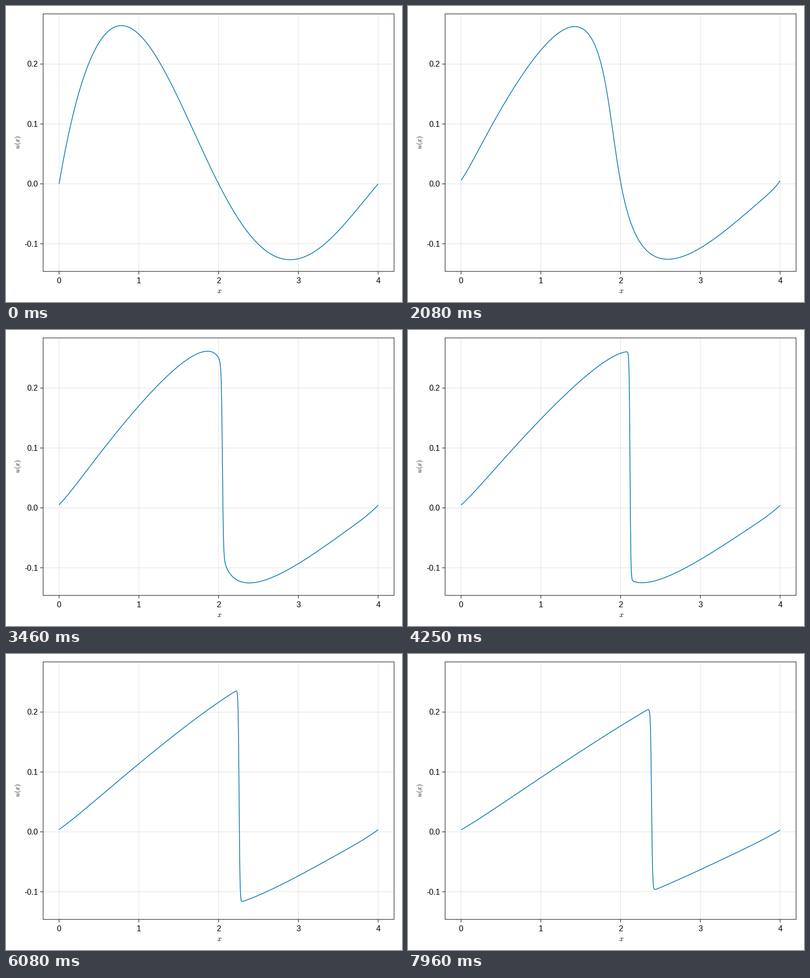
These frames come from a looping animation (800x600 px, 8000 ms). A matplotlib script:

```python
import numpy as np
import matplotlib.pyplot as plt
from matplotlib.animation import FuncAnimation

plt.rcParams["mathtext.fontset"] = "cm"
plt.rcParams["font.family"] = "Liberation Sans"

W, H, DPI = 800, 600, 72          # at 72 dpi one point is one pixel
FRAMES, DT, SUBSTEPS = 192, 0.05, 5
N, NU = 1024, 0.001
LEFT, RIGHT, TOP, BOTTOM = 75, 784, 16, 538
TICK, SMALL_MATH = 6, 14

x = np.linspace(0, 4, N)
u0 = np.sin(np.pi * x / 2) / (2 * (1 + x))


def solve():
    """Viscous Burgers equation, periodic, integrating-factor RK4."""
    k = 2 * np.pi * np.fft.rfftfreq(N, x[1] - x[0])
    h = DT / SUBSTEPS
    half = np.exp(-NU * k**2 * h / 2)
    full = half**2

    def flux(v):
        return -0.5j * k * np.fft.rfft(np.fft.irfft(v, N) ** 2)

    v = np.fft.rfft(u0)
    states = [u0]
    for _ in range(FRAMES - 1):
        for _ in range(SUBSTEPS):
            a = flux(v)
            b = flux(half * (v + h / 2 * a))
            c = flux(half * v + h / 2 * b)
            d = flux(full * v + h * half * c)
            v = full * v + h / 6 * (full * a + 2 * half * (b + c) + d)
        states.append(np.fft.irfft(v, N))
    return states


margin = 0.05 * (u0.max() - u0.min())
U_LOW, U_HIGH = u0.min() - margin, u0.max() + margin


def to_px(v):
    return LEFT + (v + 0.2) / 4.4 * (RIGHT - LEFT)


def to_py(u):
    return BOTTOM - (u - U_LOW) / (U_HIGH - U_LOW) * (BOTTOM - TOP)


fig = plt.figure(figsize=(W / DPI, H / DPI), dpi=DPI, facecolor="white")
ax = fig.add_axes([0, 0, 1, 1])
ax.set(xlim=(0, W), ylim=(H, 0))
ax.axis("off")


def stroke(xs, ys, color="black", z=3, **kw):
    return ax.plot(xs, ys, color=color, lw=kw.pop("lw", 1), zorder=z,
                   snap=False, solid_capstyle="butt", **kw)[0]


GRID = (0, 0, 0, 0.12)
for v in range(5):
    p = to_px(v)
    stroke([p, p], [TOP, BOTTOM], GRID, 1)
    stroke([p, p], [BOTTOM, BOTTOM + TICK], z=4)
    ax.text(p, 562.3, str(v), size=16, ha="center", va="baseline")

for v in (-0.1, 0.0, 0.1, 0.2):
    p = to_py(v)
    stroke([LEFT, RIGHT], [p, p], GRID, 1)
    stroke([LEFT - TICK, LEFT], [p, p], z=4)
    ax.text(64.5, p + 5.7, f"{v:.1f}", size=16, ha="right", va="baseline")

stroke([LEFT, RIGHT, RIGHT, LEFT, LEFT], [TOP, TOP, BOTTOM, BOTTOM, TOP],
       z=4, solid_joinstyle="miter")
ax.text(430.5, 578.5, "$x$", size=SMALL_MATH + 1, ha="center", va="center")
ax.text(24.5, 276.5, "$u(x)$", size=SMALL_MATH, rotation=90,
        ha="center", va="center")

states = solve()
curve = stroke(to_px(x), to_py(u0), "#0072B2", 2, lw=1.5)


def update(i):
    curve.set_ydata(to_py(states[i]))
    return (curve,)


anim = FuncAnimation(fig, update, frames=FRAMES, interval=8000 / FRAMES,
                     repeat=True, repeat_delay=0, blit=False)
plt.show()
```
